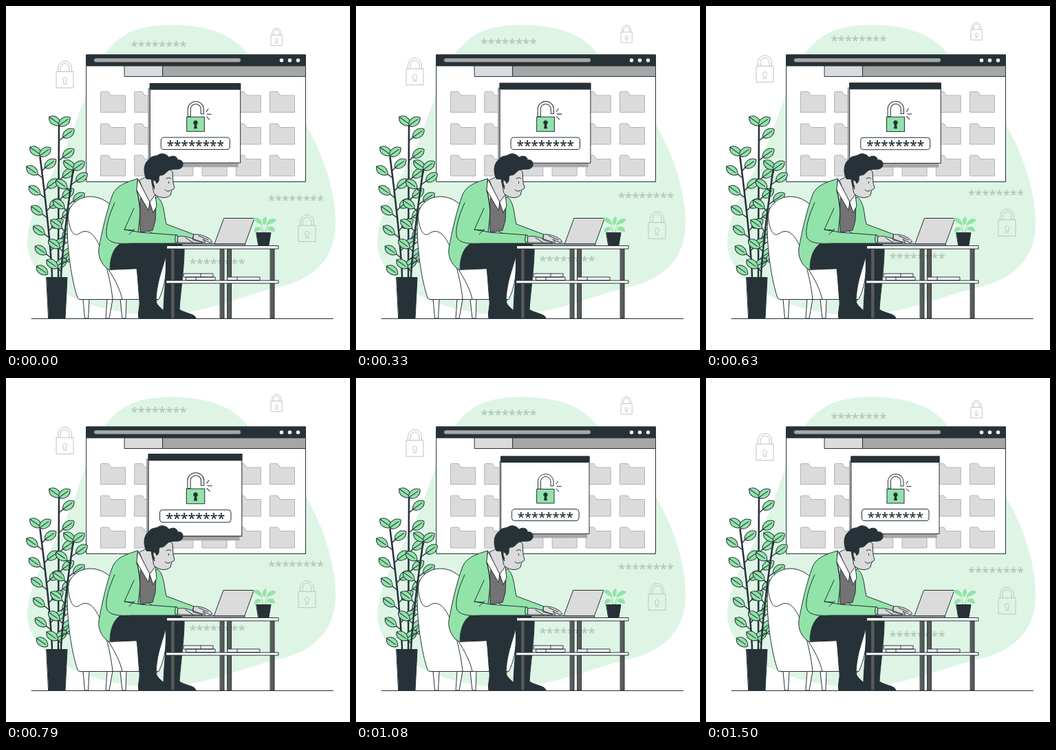
Recreate the animation shown at these times as an HTML page. Size 500 by 500 pixels, loop 1.54 s.

```html
<!DOCTYPE html>
<html lang="en">
<head>
<meta charset="utf-8">
<title>Password protection</title>
<style>
html, body { margin: 0; width: 100%; height: 100%; overflow: hidden; background: #fff }
svg { display: block; width: 100%; height: 100% }
.ink { stroke: #263238; stroke-linejoin: round; stroke-linecap: round }
.line { fill: none }
.dark { fill: #263238 }
.green { fill: #92e3a9 }
.white { fill: #fff }
.pale { fill: #dbdbdb }
.grey { fill: #a6a6a6 }
.slate { fill: #5a5a5a }
.ghost { fill: none; stroke: #bcc5bf }
text { font: 600 18.5px "Open Sans", sans-serif; text-anchor: middle }
.faint { fill: #b0c6b7 }
</style>
</head>
<body>
<svg viewBox="0 0 500 500">
  <defs>
    <path id="folder" d="M0 30V1.500Q0 0 1.500 0H11.500L15 5.500H36V30Z"/>
    <g id="leaf">
      <path d="M-10 0C-6-8 5-8 10 0C5 8-6 8-10 0Z"/>
      <path d="M-10 0H6"/>
    </g>
    <g id="padlock">
      <path d="M0 15.500H25V39H0ZM2.500 15.500V10.500A10 10.500 0 0 1 22.500 10.500V15.500M6 15.500V10.500A6.500 7 0 0 1 19 10.500V15.500"/>
      <path d="M11 29.500A3 3 0 1 1 14 29.500L14.500 33.500H10.500Z"/>
    </g>
  </defs>

  <path fill="#def5e5" d="M115 132C125 95 145 55 180 38C215 23 270 25 305 37C330 46 345 60 353 72C390 105 418 140 436 173C460 213 480 270 479 318C478 365 450 397 395 409C330 425 280 452 205 449C130 445 60 415 38 372C18 335 45 285 72 235C95 195 102 165 115 132Z"/>

  <g id="floaters">
    <g class="ghost">
      <use href="#padlock" x="73" y="80.500"/>
      <use href="#padlock" x="425" y="304"/>
      <use href="#padlock" transform="translate(385 32.700) scale(.65)" stroke-width="1.400"/>
    </g>
    <g class="faint">
      <text x="222" y="65.500">********</text>
      <text x="421.500" y="289.500">********</text>
      <text x="307" y="382">********</text>
    </g>
  </g>

  <g class="ink">
    <path class="white" d="M117 71H435.500V255.500H117Z"/>
    <path class="dark" d="M117 71H435.500V87H117Z"/>
    <rect class="grey" x="127.500" y="75.500" width="214" height="6.500" rx="3.200"/>
    <path class="pale" d="M172.500 87H228V102.500H172.500Z"/>
    <path class="grey" d="M228 87H435.500V102.500H228Z"/>
  </g>
  <path stroke="#fff" stroke-width="5.500" stroke-linecap="round" d="M400.500 79h0M412.500 79h0M424.500 79h0"/>
  <g id="folders" class="pale" stroke="#b3b3b3"></g>

  <g id="popup">
    <path class="grey" d="M208 120H336V232.500H208Z"/>
    <g class="ink">
      <path class="white" d="M211 114H339V226.500H211Z"/>
      <path class="dark" d="M211 114H339V122.500H211Z"/>
      <path class="white" d="M264.500 161V149.500A11.300 11 0 0 1 287 149.500V157H283V149.500A7.300 7 0 0 0 268.500 149.500V161Z"/>
      <path class="green" d="M263 161.500H288V182H263Z"/>
      <path class="line" d="M291 154L293.500 150M292 157.500H298M291 161L295 165"/>
      <rect class="white" x="226.500" y="190.500" width="97.500" height="17" rx="4"/>
    </g>
    <path class="dark" d="M274 172.500A3.200 3.200 0 1 1 277 172.500L278 178H273Z"/>
    <text class="dark" x="275.300" y="208.500">********</text>
  </g>

  <path class="ink line" d="M37 454.500H475.500"/>

  <g id="plant" class="ink green"></g>
  <path class="ink dark" d="M59 394.500H89L86 454H62Z"/>

  <!-- chair -->
  <g class="ink white">
    <path d="M112 426L114.500 454H119.500L121 426ZM147 426L145 454H150L155 426ZM166 426L169 454H174L175 426ZM208 426L204 454H210L220 426Z"/>
    <path d="M160 300C145 272 107 269 93 294C84 314 92 390 104 424Q105 426.500 108 426.500H222C231 408 235 385 232 352Z"/>
    <path d="M90 304C92 326 98 336 106 331C121 320 132 337 139 356C147 380 153 405 155 426.500M149 383C158 397 166 412 169 426.500" class="line"/>
  </g>

  <!-- seated man -->
  <g class="ink">
    <path class="dark" d="M152 383C150 357 160 340 188 339L259 346C260 376 254 410 252 441C260 447 275 447 276 454H229C228 425 234 395 232 364C227 385 219 400 218 430C222 440 236 445 238 454H193C191 446 195 437 194 428C192 408 192 397 190 382Z"/>
    <path class="green" d="M214 276C225 276 229 290 231 307L233 317L273 332L270 343L222 337L204 325Z"/>
    <path fill="#737373" d="M197 270L218 288L217 312L213 326L191 330Z"/>
    <path class="pale" d="M194 253L208 246L222 275L209 289Z"/>
    <path class="pale" d="M210 244C215 233 237 233 242 241L243 257L245 264Q244 267 241 267L239 275C233 281 220 279 215 272Z"/>
    <path class="white" d="M192 252L209 285L207 297L189 266ZM209 285L217 274L219 291L214 300Z"/>
    <path class="green" d="M191 251C176 256 161 260 155 274C146 298 139 330 135 352C133 366 141 379 151 384C151 360 160 342 180 341L196 337C193 318 198 300 190 268Z"/>
    <path class="green" d="M158 286C149 305 143 327 147 337C152 345 165 346 182 345L247 345C251 342 251 337 249 333L195 329L172 325L186 294"/>
    <path class="line" d="M190 268C198 290 194 309 192 328M172 325L186 326M247 333Q244 339 247 345M187 324L179 332"/>
    <path class="pale" d="M250 335C260 333 272 338 286 344H250ZM273 332C284 331 297 337 300 343L296 344L286 339L290 344L272 340Z"/>
    <path class="line" d="M261 337L272 344M280 334L294 340"/>
    <path class="dark" d="M204 251C199 242 200 228 208 223C211 217 219 219 222 216C228 213 234 216 237 220C243 216 250 219 249 224C256 222 259 229 256 234C252 239 246 236 240 238C233 238 232 247 224 246C220 249 225 253 219 258C217 252 212 250 214 258L216 266Q211 259 212 252Z"/>
    <path class="line" d="M233 251Q237 248 240 251M231 267Q234 271 239 268M216 253Q211 255 216 262"/>
    <path class="dark" d="M236.500 255.500V257.500"/>
  </g>

  <!-- table -->
  <g class="ink">
    <path class="slate" d="M240 353H245V454H240ZM311.500 353H317V454H311.500ZM322 353H327.500V454H322ZM384.500 353H390V454H384.500Z"/>
    <path class="white" d="M234 348.500H396V353H234ZM233 399H396V403H233ZM262 394H304V398.500H262ZM258.500 389H301V394H258.500ZM322 394H369V398.500H322Z"/>
    <path class="line" d="M283 389V394M276 394V398.500M336 394V398.500"/>
  </g>

  <g id="laptop" class="ink">
    <path class="grey" d="M256 345.500H347.500V348.500H256Z"/>
    <path class="pale" d="M303 345.500L316.500 308.500H361L347.500 345.500Z"/>
  </g>

  <!-- desk plant -->
  <path class="line" stroke="#92e3a9" d="M374 329Q371 313 365 312M376 329Q380 314 388 312M375 329Q368 321 362 326M376 329Q382 320 388 326"/>
  <path class="green" d="M373 318C371 308 364 306 359 309Q364 316 373 318ZM375 319C371 312 373 308 378 306Q381 313 375 319ZM378 318C382 309 388 307 393 311Q387 318 378 318ZM371 323C365 318 360 323 361 329Q368 328 371 323ZM379 323C386 317 391 322 391 328Q383 328 379 323Z"/>
  <path class="ink dark" d="M364 329.500H385L382 347.500H367Z"/>
</svg>
<script>
const PERIOD = 1540, LEAD = 40;
const $ = id => document.getElementById(id);

let folders = '';
for (const y of [124.5, 171, 217])
  for (let col = 0; col < 6; col++)
    folders += `<use href="#folder" x="${137.5 + col * 49.2}" y="${y}"/>`;
$('folders').innerHTML = folders;

const leaf = (x, y, side) =>
  `<use href="#leaf" transform="translate(${x} ${y}) rotate(${-35 * side})"/>`;

// A bent stem with a pair of leaves at its tip and more at even steps below
function branch(baseX, tipX, tipY, sides) {
  const foot = 394, height = foot - tipY;
  const xAt = y => baseX + (tipX - baseX) * ((foot - y) / height) ** 1.3;
  let stem = `M${baseX} ${foot}`, twigs = '';
  let leaves = leaf(tipX - 6, tipY - 5, -1) + leaf(tipX + 8, tipY - 4, 1);
  for (let y = foot; y >= tipY; y -= 6) stem += `L${xAt(y)} ${y}`;
  for (let y = tipY + 15; y < 380; y += 29)
    for (const side of sides) {
      const leafY = side < 0 ? y + 8 : y - 2;
      const x = xAt(leafY);
      twigs += `M${xAt(leafY + 11)} ${leafY + 11}L${x + 8 * side} ${leafY + 4}`;
      leaves += leaf(x + 14 * side, leafY, side);
    }
  return `<path class="line" stroke-width="2.5" d="${stem}"/>
    <path class="line" stroke-width="1.5" d="${twigs}"/>${leaves}`;
}
$('plant').innerHTML = branch(76, 77, 172, [1])
  + branch(67, 49, 216, [-1, 1]) + branch(80, 98, 236, [-1, 1]);

// Motion over one loop, with phase running from 0 to 1
const bob = phase => -10 * (1 - Math.abs(2 * phase - 1));
const beat = (phase, peak, fall) =>
  Math.max(0, 1 - Math.abs(phase - peak) / (phase < peak ? .1 : fall));
const pulse = phase => 1 + .1 * (beat(phase, .1, .2) + beat(phase, .5, .1));
const shake = phase => 2 * Math.sin(Math.PI * phase) * Math.cos(10 * Math.PI * phase);

const start = performance.now();
function draw() {
  const phase = (performance.now() - start + LEAD) % PERIOD / PERIOD;
  $('floaters').setAttribute('transform', `translate(0 ${bob(phase)})`);
  $('popup').setAttribute('transform',
    `translate(275 170.25) scale(${pulse(phase)}) translate(-275 -170.25)`);
  $('laptop').setAttribute('transform', `translate(${shake(phase)} 0)`);
  requestAnimationFrame(draw);
}
draw();
</script>
</body>
</html>
```
